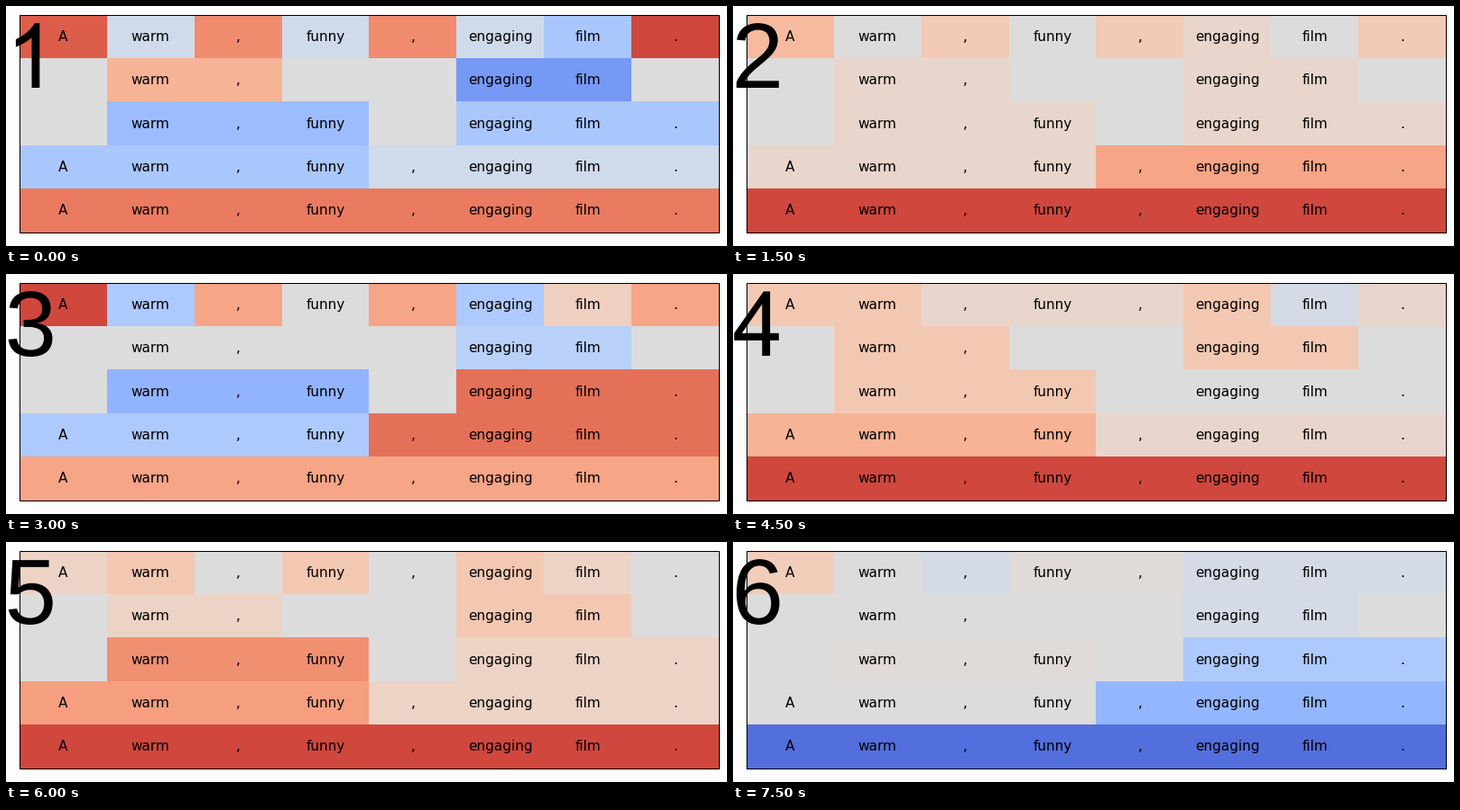
These frames come from a looping animation (799x267 px, 8000 ms). A matplotlib script:

```python
import matplotlib.pyplot as plt
import numpy as np
from matplotlib.animation import FuncAnimation
from matplotlib.patches import PathPatch, Rectangle
from matplotlib.path import Path
from matplotlib.textpath import TextPath
from matplotlib.transforms import Affine2D

W, H, DPI = 799, 267, 100
LEFT, TOP, CELL_W, CELL_H = 14.95, 10.2, 775 / 8, 48.36
NEUTRAL = 0.5

# The ";" names the second comma, so that every word has its own key
WHOLE = "A warm , funny ; engaging film ."
WORDS = WHOLE.split()
START, END = "A warm , funny", "; engaging film ."
ROWS = [WORDS, ["warm ,", "engaging film"],
        ["warm , funny", "engaging film ."], [START, END], [WHOLE]]

# Per head: the usual score, then the phrases that stand out from it
HEADS = [
    (0.45, {0.88: ["A"], 0.785: [",", ";"], 0.92: ["."], 0.68: ["warm ,"],
            0.335: ["film", "engaging film .", START],
            0.185: ["engaging film"], 0.29: ["warm , funny"], 0.82: [WHOLE]}),
    (0.545, {0.66: ["A"], 0.605: [",", ";", "."], 0.72: [END],
             NEUTRAL: ["warm", "funny", "film"], 0.92: [WHOLE]}),
    (NEUTRAL, {0.92: ["A"], 0.72: [",", ";", ".", WHOLE], 0.58: ["film"],
               0.345: ["warm", "engaging", START], 0.375: ["engaging film"],
               0.265: ["warm , funny"], 0.842: ["engaging film .", END]}),
    (0.61, {0.545: [",", "funny", ";", ".", END], 0.465: ["film"],
            NEUTRAL: ["engaging film ."], 0.68: [START], 0.92: [WHOLE]}),
    (0.565, {0.61: ["warm", "funny", "engaging", "engaging film"],
             NEUTRAL: [",", ";", "."], 0.775: ["warm , funny"],
             0.735: [START], 0.92: [WHOLE]}),
    (0.465, {0.59: ["A"], NEUTRAL: ["warm", "warm ,", START],
             0.515: ["funny", ";", "warm , funny"],
             0.345: ["engaging film ."], 0.27: [END], 0.08: [WHOLE]}),
]


def columns(phrase):
    words = phrase.split()
    first = WORDS.index(words[0])
    return range(first, first + len(words))


def grid(usual, accents):
    score = {p: s for s, phrases in accents.items() for p in phrases}
    cells = np.full((len(ROWS), len(WORDS)), NEUTRAL)
    for row, phrases in enumerate(ROWS):
        for phrase in phrases:
            cells[row, columns(phrase)] = score.get(phrase, usual)
    return cells


def one():
    """A 1 without a foot: a stem and a curved flag."""
    pts = [(37.3, 0), (28.5, 0), (28.5, 56), (21.5, 49.5), (10.9, 45.4),
           (10.9, 53.9), (26.5, 61.5), (31.6, 71.9), (37.3, 71.9), (37.3, 0)]
    line, curve = [Path.LINETO], [Path.CURVE3] * 2
    codes = ([Path.MOVETO] + line * 2 + curve + line + curve + line
             + [Path.CLOSEPOLY])
    return Path(pts, codes)


def four():
    """A 4 from its stem, its bar and the slanted stroke."""
    x0, x1, s0, s1 = 1.3, 50.8, 32.3, 41.1
    y0, y1, top = 17.1, 25.2, 71.6
    outer = [(s0, 0), (s0, y0), (x0, y0), (x0, y1), (33.9, top), (s1, top),
             (s1, y1), (x1, y1), (x1, y0), (s1, y0), (s1, 0), (s0, 0)]
    inner = [(s0, y1), (s0, 57.5), (9.9, y1), (s0, y1)]
    return Path.make_compound_path(Path(outer, closed=True),
                                   Path(inner, closed=True))


def digit(n):
    if n == 1:
        shape = one()
    elif n == 4:
        shape = four()
    else:
        shape = TextPath((-1.3, 0), str(n), size=103,
                         prop={"family": "Liberation Sans"})
    return Affine2D().scale(1, -1).translate(0, 91).transform_path(shape)


fig = plt.figure(figsize=(W / DPI, H / DPI), dpi=DPI, facecolor="#fdfdfd")
ax = fig.add_axes([0, 0, 1, 1])
ax.axis("off")

grids = [grid(*head) for head in HEADS]
digits = [digit(n + 1) for n in range(len(HEADS))]

x_edges = np.round(LEFT + CELL_W * np.arange(len(WORDS) + 1))
y_edges = np.floor(TOP + CELL_H * np.arange(len(ROWS) + 1))
mesh = ax.pcolormesh(x_edges, y_edges, grids[0], cmap="coolwarm",
                     vmin=0, vmax=1, antialiased=False, linewidth=0)
ax.set_xlim(0, W)
ax.set_ylim(H, 0)
ax.add_patch(Rectangle((15.5, 10.5), 775, 242, fill=False, snap=False,
                       edgecolor="black", linewidth=0.75, zorder=3))

for row, phrases in enumerate(ROWS):
    for col in (c for p in phrases for c in columns(p)):
        ax.text(LEFT + CELL_W * (col + 0.5), TOP + CELL_H * (row + 0.5),
                WORDS[col].replace(";", ","), family="DejaVu Sans",
                fontsize=11, ha="center", va="center", zorder=4)

number = ax.add_patch(PathPatch(digits[0], facecolor="black",
                                linewidth=0, zorder=5))


def update(frame):
    head = frame // 3
    mesh.set_array(grids[head])
    number.set_path(digits[head])
    return mesh, number


anim = FuncAnimation(fig, update, frames=16, interval=500,
                     repeat=True, repeat_delay=0)
plt.show()
```
